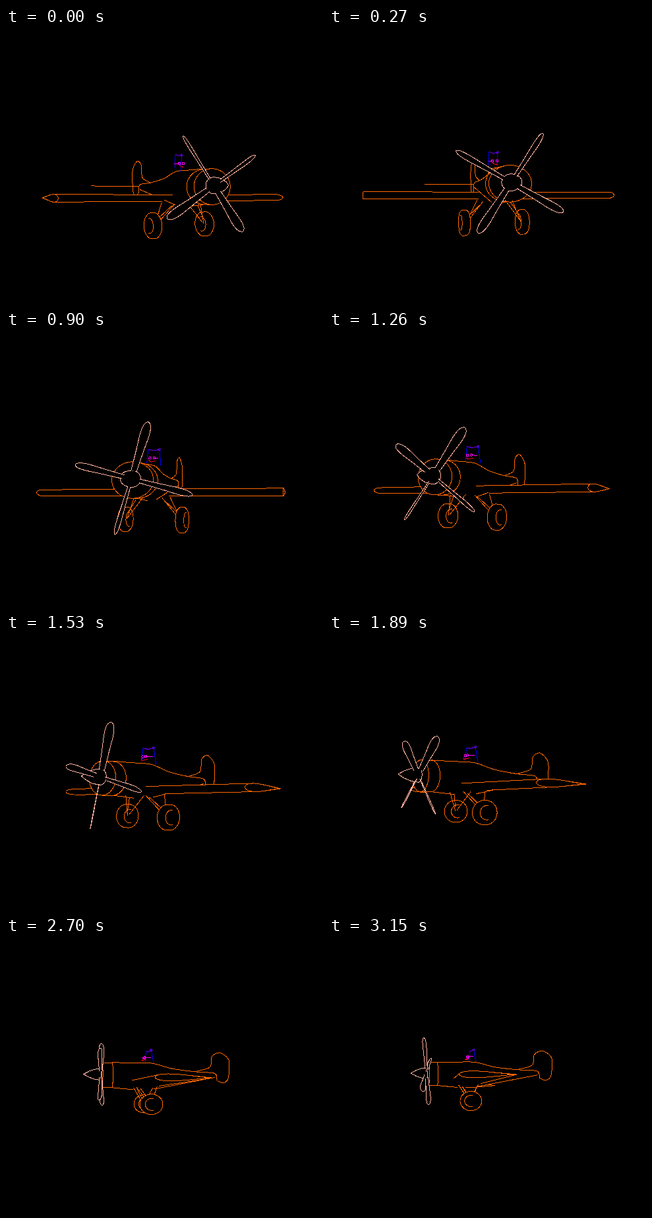
An HTML page for the animation above (3240 ms loop, 481 px wide and 416 px high).

```html
<!DOCTYPE html>
<html lang="en">
<head>
<meta charset="utf-8">
<title>Turning propeller plane</title>
<style>
  html, body { margin: 0; width: 100%; height: 100%; overflow: hidden; background: #000; }
  svg { display: block; width: 100vw; height: 100vh; }
</style>
</head>
<body>
<svg viewBox="0 0 481 416" shape-rendering="crispEdges"><g id="plane" transform="translate(.5 .5)"></g></svg>
<script>
const STEP = 90, COUNT = 36, LAST = COUNT - 1;
const ORANGE = '#ff6600', PINK = '#ffb09c', BLUE = '#0000ff', VIOLET = '#6a00ff', MAGENTA = '#ff00ff', RED = '#ff0020';
const EYE = 450, STRETCH = 1.12;
const { sin, cos, PI, exp, max, min, abs } = Math;
const rad = deg => deg * PI / 180;

// Model points are [a, s, u]: ahead, sideways and up from the middle of the plane.
const SPINE = [[63, 17], [40, 17], [12, 17], [-14, 10], [-45, 6], [-73, 4], [-76, -7]];
const BELLY = [[75, -17], [36, -21], [10, -20], [-73, -2]];
const FIN = [[-45, 6], [-66, 13], [-69, 29], [-80, 35], [-93, 24], [-92, -3], [-85, -10], [-77, -7]];
const onAxis = ([a, u]) => [a, 0, u];

// The camera for one step: yaw slows down, the plane swings, rises and shrinks.
function camera(n) {
  const yaw = rad(-29 + 5.2 * n - .054 * n * n);
  const t = min(max((n - 14) / 21, 0), 1);
  const zoom = 1.34 - .34 * t * t * (3 - 2 * t);
  const x0 = 234.5 + 14.5 * exp(-n / 9) * cos(n / 4.5);
  const y0 = 206 + 34 * (1 - n / LAST) ** 1.3;
  const tilt = .02 + .002 * n;
  const sn = sin(yaw), cs = cos(yaw);
  const at = ([a, s, u]) => {
    const z = a * cs + s * sn, p = zoom / (1 - z / EYE);
    return [x0 + (s * cs - a * sn) * STRETCH * p, y0 - (u + z * tilt) * p].map(v => +v.toFixed(2));
  };
  return { at, sn, near: sn < 0 ? -1 : 1 };
}

const propTurn = n => rad(-40 + 51.1 * n - 8 * cos(2 * PI * (n - 13) / 21));

const draw = (d, color = ORANGE, fill = 'none') => `<path d="${d}" stroke="${color}" fill="${fill}"/>`;
const line = pts => 'M' + pts.join('L');
const loop = (count, f) => Array.from({ length: count }, (_, i) => f(2 * PI * i / count));

function smooth(pts) {
  let d = 'M' + pts[0];
  for (let i = 0; i < pts.length - 1; i++) {
    const p = pts[max(i - 1, 0)], a = pts[i], b = pts[i + 1], q = pts[min(i + 2, pts.length - 1)];
    d += `C${a.map((v, k) => v + (b[k] - p[k]) / 7)} ${b.map((v, k) => v - (q[k] - a[k]) / 7)} ${b}`;
  }
  return d;
}

// Convex outline of screen points.
function hull(pts) {
  const sorted = [...pts].sort((a, b) => a[0] - b[0] || a[1] - b[1]);
  const half = list => {
    const out = [];
    for (const p of list) {
      while (out.length > 1) {
        const [a, b] = out.slice(-2);
        if ((b[0] - a[0]) * (p[1] - a[1]) - (b[1] - a[1]) * (p[0] - a[0]) > 0) break;
        out.pop();
      }
      out.push(p);
    }
    return out.slice(0, -1);
  };
  return [...half(sorted), ...half(sorted.reverse())];
}

const solid = (pts, color = ORANGE) => draw(line(hull(pts)) + 'Z', color, '#000');

// Circles across the body axis and across the wheel axle.
const ring = (a, wide, high, u = 0) => loop(40, t => [a, wide * cos(t), u + high * sin(t)]);
const disc = (a, s, u, r) => loop(40, t => [a + r * cos(t), s, u + r * sin(t)]);

function wing({ at, sn }, side) {
  const span = 122, u = -12;
  const tip = loop(32, t => [2.5 + 28.5 * cos(t), side * span, u + 5.7 * sin(t) * (1 + cos(t)) / 2]).map(at);
  const roots = [at([40, side * 20, -9]), at([5, side * 12, -16])];
  const edge = hull([...tip, ...roots]);
  let d = '';
  edge.forEach((p, i) => {
    const q = edge[(i + 1) % edge.length];
    if (!(roots.includes(p) && roots.includes(q))) d += line([p, q]);
  });
  const tipShows = side * EYE * sn > span;
  return draw(line(edge) + 'Z', 'none', '#000') + draw(d) + (tipShows ? draw(line(tip) + 'Z') : '');
}

function wheel({ at, sn, near }, side) {
  const a = 18, s = side * 29, u = -41.5;
  const tire = [[-3.5, 12], [-2, 13.6], [2, 13.6], [3.5, 12]].flatMap(([ds, r]) => disc(a, s + ds, u, r));
  let out = solid(tire.map(at));
  if (abs(sn) > .15) {
    const rim = Array.from({ length: 15 }, (_, i) => rad(-105 + 15 * i));
    out += draw(line(rim.map(t => at([a + 8 * cos(t), s + near * 3.5, u + 8 * sin(t)]))));
  }
  return out;
}

function struts({ at }, side) {
  const bar = (a, top, b, foot) => line([at([a, side * 14, top]), at([b, side * 27, foot])]);
  return draw(bar(34, -18, 20, -41) + bar(29, -20, 20, -36) + bar(8, -17, 18, -40));
}

function body({ at }) {
  const spine = SPINE.map(onAxis).map(at), belly = BELLY.map(onAxis).map(at);
  return draw(line([...spine, ...belly.reverse()]), 'none', '#000') +
    draw(line(belly.slice(0, 2)) + line(belly.slice(2))) +
    draw(smooth(spine)) +
    draw(smooth(FIN.map(onAxis).map(at)));
}

function cowl({ at }) {
  const front = ring(75, 18.9, 17.4, -1).map(at), rear = ring(63, 18.9, 17.4, -1).map(at);
  return solid([...front, ...rear]) + draw(line(front) + 'Z');
}

function pilot({ at, near }) {
  const path = (...pts) => line(pts.map(at));
  const capL = [19, -5, 35], capR = [14, 5, 35];
  const lens = side => {
    const [x, y] = at([22, side * 2.2, 25]);
    return `<circle cx="${x}" cy="${y}" r="1.8" stroke="${MAGENTA}" fill="none"/>`;
  };
  const [kx, ky] = at(capR);
  return draw(path(capR, [11, 5.5, 17]) + path(capL, [20, -6, 20]), BLUE) +
    draw(path(capL, [17, 0, 33.5], capR), VIOLET) +
    `<circle cx="${kx}" cy="${ky}" r="1.5" stroke="${VIOLET}" fill="none"/>` +
    draw(smooth([[23, -3, 23], [25, 0, 20.5], [20, 3, 22]].map(at)), RED) +
    lens(-1) + lens(1) + draw(path([22, near * 2, 25], [14, near * 4, 25]), MAGENTA);
}

function propeller({ at }, turn) {
  const hub = 77, reach = 55;
  const cone = [[77, 8], [84, 7], [91, 4.2], [98, 0]].flatMap(([a, r]) => ring(a, r * 1.05, r));
  let out = solid(cone.map(at), PINK);
  const half = [[.14, .6], [.5, .8], [.78, 1], [.94, .75]];
  for (let i = 0; i < 4; i++) {
    const t = turn + i * PI / 2;
    // The blade is twisted, so its width lies partly along the axis.
    const point = ([r, k]) => at([
      hub - 2.7 * k,
      reach * r * sin(t) + 3.1 * k * cos(t),
      reach * r * cos(t) - 3.1 * k * sin(t)
    ]);
    const back = half.map(([r, k]) => [r, -k]).reverse();
    out += draw(smooth([...half, [1, 0], ...back].map(point)), PINK, '#000');
  }
  return out;
}

function scene(n) {
  const cam = camera(n), near = cam.near, far = -near;
  return draw(line([[-75, 0, 2], [-75, -58, 2]].map(cam.at))) +
    wing(cam, far) + body(cam) + pilot(cam) + cowl(cam) +
    wheel(cam, far) + struts(cam, far) + struts(cam, near) + wheel(cam, near) +
    wing(cam, near) + propeller(cam, propTurn(n));
}

const plane = document.getElementById('plane');
const start = performance.now();
let shown = -1;
function tick() {
  const n = Math.floor((performance.now() - start) / STEP) % COUNT;
  if (n !== shown) {
    plane.innerHTML = scene(n);
    shown = n;
  }
  requestAnimationFrame(tick);
}
tick();
</script>
</body>
</html>
```
